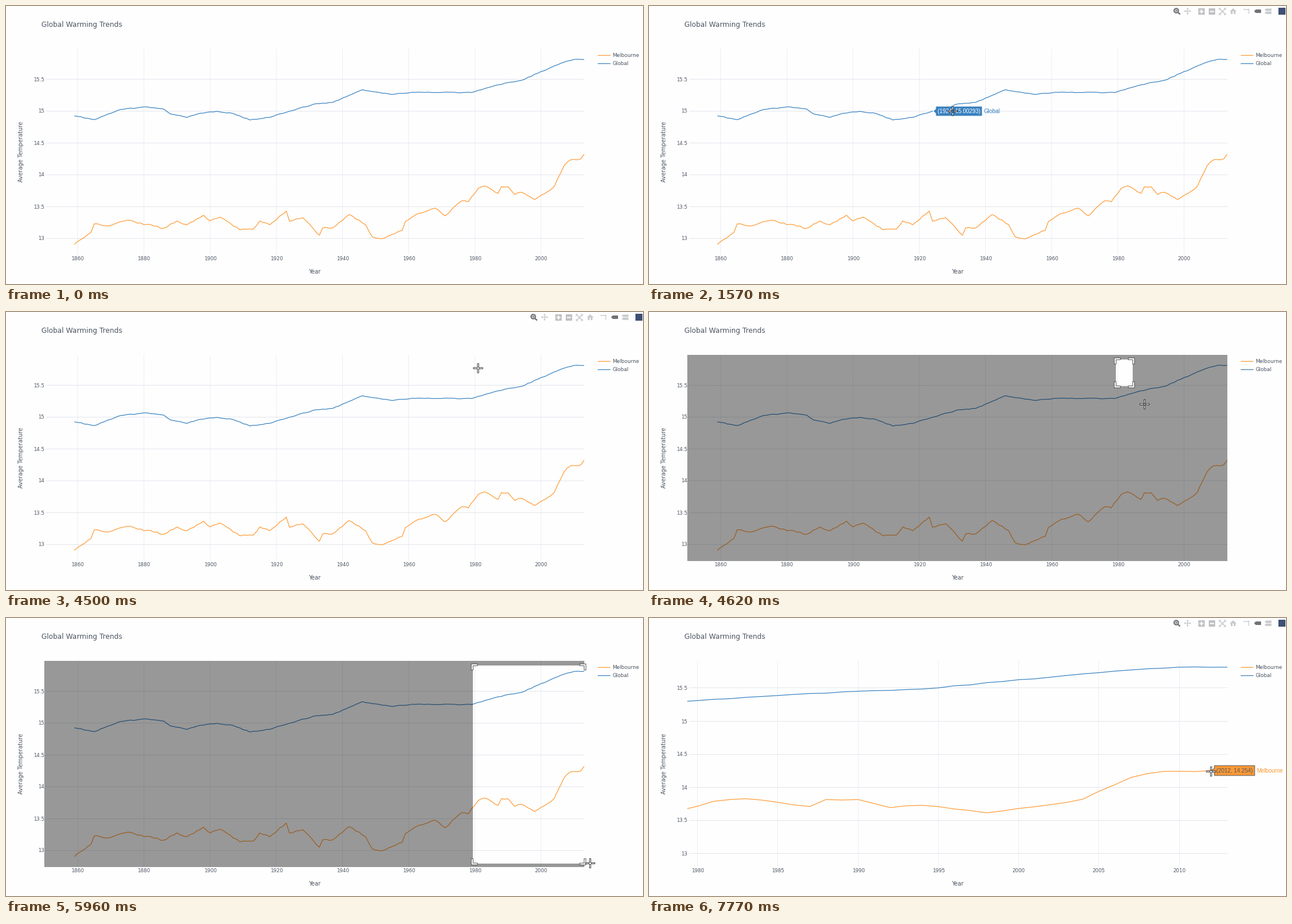
Recreate the animation shown at these times as a matplotlib script. Size 1097 px wide and 480 px high, loop 8000 ms.

```python
import numpy as np
import matplotlib.pyplot as plt
from matplotlib.animation import FuncAnimation
from matplotlib.patches import Circle, PathPatch, Polygon, Rectangle
from matplotlib.path import Path

W, H, DPI = 1097, 480, 64
PX = 72 / DPI                      # points per pixel
LOOP, INTERVAL = 8000, 40
LEFT, TOP, RIGHT, BOTTOM = 66, 74, 996, 430
BLUE, ORANGE, INK = "#3780bf", "#ff9933", "#4d5663"
DIM, ACTIVE = "#c9cacd", "#707276"

YEARS = np.arange(1859, 2014)
rng = np.random.default_rng(4)


def curve(turning_points, wobble):
    """Yearly values through the turning points, slightly uneven in between."""
    years, values = np.transpose(turning_points)
    noise = rng.uniform(-wobble, wobble, len(YEARS)) * ~np.isin(YEARS, years)
    return np.interp(YEARS, years, values) + noise


GLOBAL = curve([
    (1859, 14.93), (1865, 14.87), (1873, 15.03), (1881, 15.07), (1886, 15.035),
    (1888, 14.96), (1893, 14.905), (1897, 14.97), (1902, 15), (1907, 14.965),
    (1912, 14.865), (1918, 14.905), (1924, 15.00293), (1932, 15.12), (1937, 15.14),
    (1946, 15.34), (1955, 15.265), (1961, 15.3), (1979, 15.295), (1987, 15.417),
    (1994, 15.485), (1999, 15.598), (2007, 15.773), (2010, 15.815), (2013, 15.815)],
    0.006)
MELBOURNE = curve([
    (1859, 12.91), (1864, 13.1), (1865, 13.235), (1869, 13.2), (1875, 13.29),
    (1886, 13.165), (1890, 13.28), (1893, 13.22), (1898, 13.37), (1900, 13.28),
    (1903, 13.34), (1909, 13.14), (1913, 13.15), (1915, 13.28), (1918, 13.22),
    (1923, 13.435), (1924, 13.275), (1928, 13.33), (1933, 13.055), (1934, 13.17),
    (1937, 13.17), (1942, 13.38), (1947, 13.22), (1949, 13.03), (1952, 13),
    (1958, 13.13), (1959, 13.27), (1963, 13.4), (1968, 13.48), (1971, 13.36),
    (1976, 13.595), (1978, 13.58), (1981, 13.79), (1983, 13.83), (1987, 13.712),
    (1988, 13.817), (1990, 13.817), (1992, 13.695), (1994, 13.73), (1998, 13.616),
    (2001, 13.708), (2004, 13.822), (2007, 14.15), (2009, 14.241), (2012, 14.254),
    (2013, 14.327)], 0.012)
SERIES = [("Melbourne", MELBOURNE, ORANGE, INK, 3), ("Global", GLOBAL, BLUE, "white", 5)]

# The screen refreshes in bursts of 120 ms steps.
BURSTS = [(120, 720), (970, 1690), (1810, 2170), (2670, 3150), (3400, 3640),
          (3890, 4250), (4500, 4740), (4990, 5710), (5960, 6680), (6800, 7400),
          (7770, 7770)]
STEPS = np.concatenate([np.arange(a, b + 1, 120) for a, b in BURSTS])
LAG = 60                           # hover and selection trail the pointer
DRAG_START, ZOOM_TIME = 4620, 6080
ANCHOR = (804, 82)
POINTER = np.transpose([           # time, x, y
    (120, 300, 470), (720, 335, 185), (850, 335, 184), (1510, 488, 181),
    (1570, 523, 181.5), (1690, 655, 190), (2170, 706, 149), (2550, 706, 149),
    (3150, 791, 69), (4250, 804, 82), (4500, 813, 97), (4870, 938, 289),
    (4990, 960.5, 321.5), (5590, 1006, 423.5), (6020, 1006, 423.5), (6680, 778, 421),
    (7040, 880, 200), (7400, 970, 262), (7600, 968, 265)])

fig = plt.figure(figsize=(W / DPI, H / DPI), dpi=DPI, facecolor="#fefefe")
ax = fig.add_axes([0, 0, 1, 1])
ax.set(xlim=(0, W), ylim=(H, 0))
ax.axis("off")
plot_clip = Rectangle((LEFT, TOP), RIGHT - LEFT, BOTTOM - TOP, transform=ax.transData)


def label(x, y, text, size, color=INK, font="DejaVu Sans", **kw):
    return ax.text(x, y, text, fontsize=size * PX, color=color, family=font, **kw)


def stroke(xs, ys, color, width=1.0, **kw):
    kw.setdefault("solid_capstyle", "butt")
    return ax.plot(xs, ys, color=color, lw=width * PX, snap=False, **kw)[0]


def show(artists, on):
    for artist in artists:
        artist.set_visible(on)


class View:
    """One axis range with its grid, tick labels and curves."""

    def __init__(self, year0, x0, per_year, y13, per_degree, year_ticks):
        self.to_x = lambda year: x0 + (year - year0) * per_year
        self.to_y = lambda value: y13 - (value - 13) * per_degree
        self.artists = []
        add = self.artists.append
        for year in year_ticks:
            x = np.floor(self.to_x(year)) + 0.5
            add(stroke([x, x], [TOP, BOTTOM], "#eceef3", zorder=1))
            add(label(x, 439.3, str(year), 8.6, ha="center"))
        for value in np.arange(13, 16, 0.5):
            y = np.floor(self.to_y(value)) + 0.5
            add(stroke([69, RIGHT], [y, y], "#e3e6ed", zorder=1))
            add(label(66.3, y + 3, f"{value:g}", 8.6, ha="right"))
        for _, values, color, *_ in SERIES:
            line = stroke(self.to_x(YEARS), self.to_y(values), color, 1.2, zorder=2,
                          solid_joinstyle="round")
            line.set_clip_path(plot_clip)
            add(line)

    def nearest(self, x, y):
        best = (20, None)
        for name, values, *style in SERIES:
            xs, ys = self.to_x(YEARS), self.to_y(values)
            dist = np.hypot(xs - x, ys - y)
            i = dist.argmin()
            if dist[i] < best[0]:
                best = (dist[i], (name, YEARS[i], values[i], xs[i], ys[i], *style))
        return best[1]


def make_modebar():
    parts = []

    def patch(p):
        parts.append(ax.add_patch(p))

    def box(x, y, w, h, color=DIM):
        patch(Rectangle((x, y), w, h, fc=color, lw=0))

    def poly(points, color):
        patch(Polygon(points, fc=color, lw=0))

    def line(xs, ys, color, width):
        parts.append(stroke(xs, ys, color, width))

    # zoom
    patch(Circle((908, 8), 3.7, fc="none", ec=ACTIVE, lw=2.2 * PX))
    line([906, 910], [8, 8], ACTIVE, 1.2)
    line([908, 908], [6, 10], ACTIVE, 1.2)
    line([910.5, 914.5], [10.5, 14.5], ACTIVE, 2.4)
    # pan
    for dx, dy in ((1, 0), (-1, 0), (0, 1), (0, -1)):
        tip, along, side = np.array([(927.5 + 6 * dx, 9 + 6 * dy), (dx, dy), (dy, dx)])
        line([927.5, tip[0] - dx], [9, tip[1] - dy], DIM, 1.4)
        poly([tip, tip - 2.5 * along + 2.2 * side, tip - 2.5 * along - 2.2 * side], DIM)
    # zoom in and out
    for x in (951.5, 969.5):
        box(x - 5.5, 4, 11, 11, "#bfc0c3")
        line([x - 3.5, x + 3.5], [9.5, 9.5], "white", 2)
    line([951.5, 951.5], [6, 13], "white", 2)
    # autoscale
    for sx in (-1, 1):
        for sy in (-1, 1):
            cx, cy = 987.5 + 5.5 * sx, 9.5 + 5.5 * sy
            line([987.5, cx - sx], [9.5, cy - sy], DIM, 1.6)
            line([cx - 3 * sx, cx, cx], [cy, cy, cy - 3 * sy], DIM, 1.3)
    # home
    poly([(1000, 9.5), (1006, 4), (1012, 9.5)], DIM)
    box(1002, 9, 3, 5)
    box(1007, 9, 3, 5)
    # spike lines
    for i in range(3):
        box(1032, 5 + 3 * i, 1.8, 1.8)
        box(1024 + 3 * i, 5, 1.8, 1.8)
    # hover modes
    tag = np.array([(0, 0), (3, -3), (12, -3), (12, 3), (3, 3)])
    poly(tag + (1042, 9), ACTIVE)
    for y in (6.5, 11.7):
        poly(tag * (1, 0.68) + (1060, y), DIM)
    box(1084, 3, 12, 12, "#3f4f75")
    return parts


def make_cross():
    reach = np.array([3, 7, np.nan])
    zero = reach * 0
    xs = np.concatenate([reach, -reach, zero, zero])
    ys = np.concatenate([zero, zero, reach, -reach])
    lines = [stroke(xs, ys, color, width, zorder=9, solid_capstyle="projecting")
             for color, width in (("#1c1f24", 3), ("white", 1.3))]
    return lines, xs, ys


ARROW = np.array([(0, 0), (0, 12.5), (2.8, 10), (4.9, 14.6), (6.9, 13.7),
                  (4.9, 9.2), (8.6, 9.2)])

views = [View(1860, 123.5, 5.7, 401.9, 110, range(1860, 2001, 20)),
         View(1980, 83.5, 27.65, 406.9, 114.4, range(1980, 2011, 5))]

label(61, 36, "Global Warming Trends", 12.05)
label(531, 461.5, "Year", 9.75, ha="center")
label(26, 251.5, "Average Temperature", 9.7, rotation=90, ha="center", va="center")
for (name, _, color, *_), y in zip(SERIES, (85.3, 99.5)):
    stroke([1019, 1041], [y, y], color, 1.2)
    label(1044.5, y + 3, name, 8.8)

modebar = make_modebar()
shade = ax.add_patch(PathPatch(Path([(0, 0)]), fc="black", alpha=0.4, lw=0, zorder=4))
corners = [stroke([], [], color, width, zorder=5, solid_capstyle="projecting",
                  solid_joinstyle="miter")
           for color, width in (("#444444", 4), ("white", 2.2))]
tooltip = ax.add_patch(Polygon([(0, 0)] * 3, zorder=6, lw=1 * PX))
tip_text = label(0, 0, "", 9.8, font="Liberation Sans", zorder=7)
tip_name = label(0, 0, "", 9.8, font="Liberation Sans", zorder=7)
cross, cross_x, cross_y = make_cross()
arrow = ax.add_patch(Polygon(ARROW, fc="white", ec="#1c1f24", lw=1.3 * PX, zorder=9))


def pointer(t):
    times, xs, ys = POINTER
    return np.interp(t, times, xs), np.interp(t, times, ys)


def inside(x, y):
    return LEFT <= x <= RIGHT and TOP <= y <= BOTTOM


def text_width(text, size):
    em = sum(.556 if c.isdigit() else .333 if c in "()" else .278 for c in text)
    return em * size


def draw_tooltip(hit):
    show([tooltip, tip_text, tip_name], hit is not None)
    if hit is None:
        return
    name, year, value, x, y, color, ink, digits = hit
    text = f"({year}, {value:.{digits}f})"
    x0, x1 = x + 5.5, x + 11 + text_width(text, 9.8)
    tooltip.set_xy([(x + 1, y), (x0, y - 4), (x0, y - 8.5), (x1, y - 8.5),
                    (x1, y + 8.5), (x0, y + 8.5), (x0, y + 4)])
    tooltip.set(facecolor=color, edgecolor=ink)
    tip_text.set(text=text, color=ink, position=(x0 + 2.8, y + 3.4))
    tip_name.set(text=name, color=color, position=(x1 + 2.8, y + 3.4))


def draw_selection(x, y):
    (l, t), r, b = ANCHOR, min(x, RIGHT), min(y, BOTTOM)
    outer = [(LEFT, TOP), (RIGHT, TOP), (RIGHT, BOTTOM), (LEFT, BOTTOM), (LEFT, TOP)]
    inner = [(l, t), (l, b), (r, b), (r, t), (l, t)]
    codes = [Path.MOVETO] + [Path.LINETO] * 3 + [Path.CLOSEPOLY]
    shade.set_path(Path(outer + inner, codes * 2))
    xs, ys = [], []
    for cx, sx in ((l, -1), (r, 1)):
        for cy, sy in ((t, -1), (b, 1)):
            ox, oy = cx + 1.2 * sx, cy + 1.2 * sy
            xs += [ox - 7.5 * sx, ox, ox, np.nan]
            ys += [oy, oy, oy - 7.5 * sy, np.nan]
    for line in corners:
        line.set_data(xs, ys)


def update(frame):
    now = frame * INTERVAL + 30
    index = np.searchsorted(STEPS, now, side="right") - 1
    started = index >= 0
    t = STEPS[max(index, 0)]
    dragging = DRAG_START <= t < ZOOM_TIME
    zoomed = int(t >= ZOOM_TIME)
    for i, view in enumerate(views):
        show(view.artists, i == zoomed)
    show(modebar, started and not dragging)

    x, y = pointer(t)
    trail = pointer(t - LAG)
    crosshair = dragging or inside(x, y)
    show(cross, started and crosshair)
    arrow.set_visible(started and not crosshair)
    for line in cross:
        line.set_data(cross_x + x, cross_y + y)
    arrow.set_xy(ARROW + (x, y))

    show([shade, *corners], dragging)
    if dragging:
        draw_selection(*trail)
    hovering = started and not dragging and inside(*trail)
    draw_tooltip(views[zoomed].nearest(*trail) if hovering else None)
    return []


anim = FuncAnimation(fig, update, frames=LOOP // INTERVAL, interval=INTERVAL,
                     repeat=True, repeat_delay=0, blit=False)
plt.show()
```
